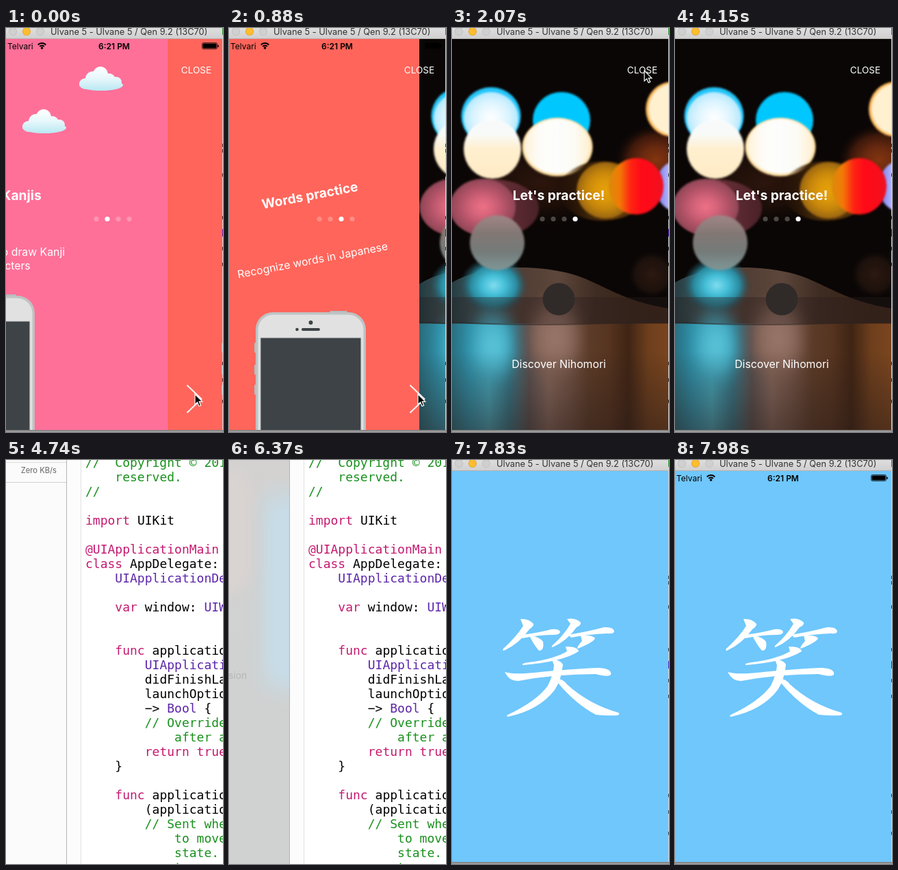
These frames come from a looping animation (317 px wide and 587 px high, 8000 ms). An HTML page with a canvas:

```html
<!DOCTYPE html>
<html lang="en">
<head>
<meta charset="utf-8">
<title>Onboarding walkthrough</title>
<style>
html, body { margin: 0; width: 100%; height: 100%; overflow: hidden; background: #fff; }
canvas { display: block; width: 317px; height: 587px; }
</style>
</head>
<body>
<canvas id="stage" width="317" height="587"></canvas>
<script>
const W = 317, H = 587, LOOP = 8000, PAGE = 320, MID = 156;
const ctx = document.getElementById('stage').getContext('2d');
const UI = 'Inter, Roboto, sans-serif';
const MONO = '"DejaVu Sans Mono", "Liberation Mono", monospace';
const PINK = '#ff7099', CORAL = '#ff655b', SKY = '#6fc7fc';

// The picture only changes at these moments.
const TICKS = [0, 140, 290, 740, 880, 1030, 1180, 1330, 1630, 1780, 1920, 2070,
  3270, 3420, 3560, 3710, 4000, 4150, 4740, 4890, 6370, 6520, 6660,
  7250, 7390, 7540, 7830, 7980];

const clamp = v => Math.max(0, Math.min(1, v));
const lerp = (a, b, k) => a + (b - a) * k;
const ease = k => k < .5 ? 2 * k * k : 1 - 2 * (1 - k) * (1 - k);
const scroll = (t, start) => ease(clamp((t - start) / 410));

function rect(x, y, w, h, fill) {
  ctx.fillStyle = fill;
  ctx.fillRect(x, y, w, h);
}

function oval(x, y, rx, ry, fill) {
  ctx.beginPath();
  ctx.ellipse(x, y, rx, ry, 0, 0, Math.PI * 2);
  ctx.fillStyle = fill;
  ctx.fill();
}

function round(x, y, w, h, r, fill) {
  ctx.beginPath();
  ctx.roundRect(x, y, w, h, r);
  ctx.fillStyle = fill;
  ctx.fill();
}

function text(str, x, y, font, fill, align = 'left') {
  ctx.font = font;
  ctx.fillStyle = fill;
  ctx.textAlign = align;
  ctx.fillText(str, x, y);
}

function at(x, y, draw, turn = 0) {
  ctx.save();
  ctx.translate(x, y);
  ctx.rotate(turn);
  draw();
  ctx.restore();
}

function faded(alpha, draw) {
  ctx.save();
  ctx.globalAlpha *= alpha;
  draw();
  ctx.restore();
}

function clipped(x, y, w, h, draw) {
  ctx.save();
  ctx.beginPath();
  ctx.rect(x, y, w, h);
  ctx.clip();
  draw();
  ctx.restore();
}

function spread(g, colors) {
  colors.forEach((c, i) => g.addColorStop(i / (colors.length - 1), c));
  return g;
}
const down = (y0, y1, ...colors) => spread(ctx.createLinearGradient(0, y0, 0, y1), colors);
const across = (x0, x1, ...colors) => spread(ctx.createLinearGradient(x0, 0, x1, 0), colors);

const heading = (str, y = 0) => text(str, 0, y, `700 19.2px ${UI}`, '#fff', 'center');
const caption = (str, y = 0) => text(str, 0, y, `400 15.8px ${UI}`, '#fff', 'center');

function cloud(x, y) {
  at(x, y, () => {
    const fill = down(0, 35, '#ffffff', '#e6f7fb', '#b9e8f2');
    oval(31, 12, 11, 12, fill);
    oval(20, 18, 11, 11, fill);
    oval(44, 19, 9, 9, fill);
    oval(54, 23, 8, 8, fill);
    oval(10, 25, 10, 8, fill);
    oval(32, 27, 32, 8, fill);
  });
}

function phone(cx, top) {
  at(cx - 80.5, top, () => {
    round(108, -1, 26, 6, 2, '#b5bbbd');
    for (const y of [45, 77, 106]) round(-2, y, 5, 15, 2, '#b5bbbd');
    round(0, 1, 161, 300, 25, '#bfc3c3');
    round(3.5, 4.5, 154, 300, 22, '#e1e1e1');
    oval(80.5, 16, 3, 3, '#3e4447');
    oval(60.5, 26, 2.3, 2.3, '#3e4447');
    round(67, 24, 27, 4, 2, '#3e4447');
    rect(6.5, 37.5, 148, 260, '#c9cccc');
    rect(7.5, 38.5, 146, 260, '#3d4346');
  });
}

function glow(x, y, rx, ry, ...colors) {
  at(x, y, () => {
    ctx.scale(rx, ry);
    oval(0, 0, 1, 1, spread(ctx.createRadialGradient(0, 0, 0, 0, 0, 1), colors));
  });
}

function quay() {
  ctx.beginPath();
  ctx.moveTo(-4, 372);
  ctx.bezierCurveTo(40, 345, 110, 343, 165, 355);
  ctx.bezierCurveTo(215, 366, 240, 396, 320, 408);
  ctx.lineTo(320, 436);
  ctx.lineTo(-4, 436);
  ctx.fillStyle = across(-4, 316, '#223a40', '#4a5e61', '#523e35', '#5d463b', '#3f2c22', '#3a2519', '#3a2418');
  ctx.fill();

  glow(61, 374, 50, 42, '#7fdcee', '#45bfd8', '#2a8ba0', 'rgba(30,80,92,0)');
  rect(-4, 429, PAGE, 160, across(-4, 316,
    '#2a6a7a', '#2f8fa8', '#46a9be', '#35788a', '#5a5150', '#86685d', '#735447',
    '#5c3c29', '#563420', '#3f2414', '#6e3f1d', '#7a451f'));
  ctx.filter = 'blur(7px)';
  glow(60, 462, 40, 66, '#5cc6da', '#49b2c9', 'rgba(50,150,172,0)');
  glow(150, 450, 46, 70, '#9a796c', '#8b6a5d', 'rgba(120,88,74,0)');
  ctx.filter = 'none';
  rect(-4, 470, PAGE, 120, down(470, 584, 'rgba(42,28,24,0)', 'rgba(42,28,24,.5)'));
  rect(-4, 391, PAGE, 39, 'rgba(40,30,28,.36)');
  ctx.beginPath();
  ctx.moveTo(-4, 427);
  ctx.quadraticCurveTo(120, 436, 316, 425);
  ctx.strokeStyle = 'rgba(45,35,34,.55)';
  ctx.lineWidth = 2;
  ctx.stroke();
}

// Night lights out of focus above a wet quay.
function photo() {
  rect(-4, 16, PAGE, 568, '#0a0605');
  glow(130, 225, 120, 70, '#2c150c', '#1c0e08', 'rgba(10,6,5,0)');
  glow(298, 192, 62, 54, '#83350f', '#6a2a10', '#3d180b', 'rgba(10,6,5,0)');
  glow(292, 358, 36, 36, '#2c1912', '#24140e', '#1d110c', 'rgba(10,6,5,0)');
  quay();

  ctx.filter = 'blur(1.6px)';
  oval(62, 262, 65, 42, across(-4, 127, '#5e3038', '#693038', '#4a2128'));
  glow(45, 260, 48, 41, '#ee7085', '#d5647a', '#b45368', '#8f4656');
  oval(66, 312, 40, 40, down(272, 352, '#a08586', '#827774', '#747b79', '#7f9797'));

  oval(57, 128, 43.5, 42, '#25c6fa');
  glow(57, 131, 40, 38, '#ffffff', '#eefaff', '#d9f3fe', '#b5e9fd');
  oval(59, 176, 42, 43, down(133, 219, '#f8fafa', '#f8faf8', '#ffefce', '#ffedca', '#fdeac4'));

  oval(160, 134, 42, 41, '#00c8ff');
  oval(154, 173, 51.5, 42.5, '#fcdca0');
  oval(154, 172, 48.5, 40, across(104, 203, '#fff2d6', '#fdfcf8', '#fcfdfc', '#fcfbf5', '#ffefcf'));

  oval(322, 118, 39, 40, '#fcb85a');
  oval(323, 118, 36, 37, '#fff0cf');
  oval(335, 230, 38, 39, across(297, 317, '#6f72e0', '#b3b5ff'));

  oval(220, 237, 64, 43, across(156, 240, 'rgba(50,25,8,0)', '#3c2409', '#5c360b'));
  glow(224, 236, 42, 41, '#e5a008', '#dc980a', '#c5850b', '#996511');
  oval(269, 230, 40, 41, across(229, 309, '#d98a0a', '#f27a06', '#fd2412', '#ff0a18', '#fa0c1a', '#ee1020'));
  ctx.filter = 'none';
}

function practicePage() {
  clipped(-4, 16, PAGE, 568, photo);
  at(MID, 250, () => heading("Let's practice!"));
  oval(156, 394, 23.5, 23.5, '#302b29');
  at(MID, 494, () => caption('Discover Nihomori'));
}

function kanjiPage(p) {
  rect(-4 - p * PAGE, 16, PAGE, 568, PINK);
  const slide = MID - 2 * p * PAGE;
  cloud(187 - p * PAGE, 56);
  cloud(104 - p * PAGE, 118);
  at(slide, 250, () => heading('Draw Kanjis'));
  at(slide, 331, () => { caption('Learn how to draw Kanji'); caption('characters', 20); });
  phone(157.5 - 784 * p, 388);
}

// k: -1 waiting on the right, 0 centred, 1 gone to the left
function wordsPage(k) {
  const dx = -k * PAGE, turn = -k * Math.PI / 2;
  rect(-4 + dx, 16, PAGE, 568, CORAL);
  at(MID + dx, 243, () => heading('Words practice', 7), turn);
  at(MID + dx + 4, 337, () => caption('Recognize words in Japanese', 6), turn);
  phone(157.5 + dx, 412);
}

function statusBar() {
  text('Telvari', 2, 31, `400 12px ${UI}`, '#000');
  ctx.strokeStyle = '#000';
  ctx.lineWidth = 2;
  for (const r of [4.5, 8]) {
    ctx.beginPath();
    ctx.arc(52.5, 30, r, -Math.PI * .76, -Math.PI * .24);
    ctx.stroke();
  }
  oval(52.5, 29, 1.8, 1.8, '#000');
  text('6:21 PM', 158, 31, `600 12px ${UI}`, '#000', 'center');
  ctx.beginPath();
  ctx.roundRect(286.5, 21.5, 22, 9, 2);
  ctx.lineWidth = .7;
  ctx.stroke();
  round(287.5, 22.5, 20, 7, 1, '#000');
  round(309.4, 24.5, 1.4, 3.5, 1, '#000');
}

function windowFrame() {
  rect(0, 0, W, 16, down(0, 16, '#dedede', '#cfcfcf'));
  rect(0, 15, W, 1, '#b5b0b0');
  [[10, '#d0d0d0', '#bcbcbc'], [30, '#fdbd2f', '#dfa023'], [50, '#d0d0d0', '#bcbcbc']]
    .forEach(([x, fill, edge]) => {
      oval(x, 5, 6, 6, edge);
      oval(x, 5, 5.2, 5.2, fill);
    });
  text('Ulvane 5 - Ulvane 5 / Qen 9.2 (13C70)', 65, 10, `400 12.8px ${UI}`, '#333');
  rect(316, 0, 1, H, '#d9d9d9');
  for (const y of [168, 176, 211, 273, 318, 341, 485, 509, 540]) rect(316, y, 1, 5, '#444');
  rect(316, 0, 1, 10, '#2a932a');
  rect(316, 292, 1, 11, '#5b2bb5');
  rect(0, 584, W, 3, down(584, 587, '#777', '#aaa'));
}

function chevron() {
  ctx.beginPath();
  ctx.moveTo(264.5, 519);
  ctx.lineTo(285.5, 539);
  ctx.lineTo(264.5, 559);
  ctx.strokeStyle = '#fff';
  ctx.lineWidth = 1.8;
  ctx.stroke();
}

function cursor(x, y) {
  at(x, y, () => {
    ctx.beginPath();
    [[0, 0], [0, 15], [3.6, 11.7], [6, 17.5], [8.6, 16.4], [6.2, 10.8], [10.8, 10.8]]
      .forEach(([a, b]) => ctx.lineTo(a, b));
    ctx.closePath();
    ctx.fillStyle = '#000';
    ctx.strokeStyle = '#fff';
    ctx.lineWidth = 1.2;
    ctx.fill();
    ctx.stroke();
  });
}

function pointer(t) {
  if (t < 1330) return cursor(276, 532);
  if (t < 4000) {
    const k = ease(clamp((t - 1480) / 590));
    return cursor(lerp(257, 281, k), lerp(191, 62, k));
  }
  if (t < 4150) cursor(160, 38);
}

function walkthrough(t) {
  const first = scroll(t, -145), second = scroll(t, 780);
  const pos = 1 + first + second;
  clipped(0, 16, 316, 568, () => {
    if (second < 1) wordsPage(pos - 2);
    if (first < 1) clipped(-4 - first * PAGE, 16, PAGE, 568, () => kanjiPage(first));
    if (second > 0) at((1 - second) * PAGE, 0, practicePage);
    if (second < 1) {
      statusBar();
      faded(clamp(2 - 2 * second), chevron);
    }
    for (let i = 0; i < 4; i++)
      oval(132 + 16 * i, 277.5, 3.6, 3.6, i === Math.round(pos) ? '#fff' : 'rgba(255,255,255,.26)');
    const press = t < 3270 || t >= 3710 ? 1 : t < 3560 ? .3 : .65;
    faded(press, () => text('CLOSE', 300, 66, `400 13.5px ${UI}`, '#fff', 'right'));
  });
  windowFrame();
  pointer(t);
}

// [row, column, colour, text, colour, text ...]
const GREEN = '#1a911e', KEY = '#c41a70', TYPE = '#5c26ab', INK = '#000';
const CODE = [
  [0, 0, GREEN, '//  Copyright © 2016'],
  [1, 4, GREEN, 'reserved.'],
  [2, 0, GREEN, '//'],
  [4, 0, KEY, 'import', INK, ' UIKit'],
  [6, 0, KEY, '@UIApplicationMain'],
  [7, 0, KEY, 'class', INK, ' AppDelegate: '],
  [8, 4, TYPE, 'UIApplicationDelegate'],
  [10, 4, KEY, 'var', INK, ' window: ', TYPE, 'UIWindow'],
  [13, 4, KEY, 'func', INK, ' application'],
  [14, 8, TYPE, 'UIApplication'],
  [15, 8, INK, 'didFinishLaunching'],
  [16, 8, INK, 'launchOptions'],
  [17, 8, INK, '−> ', TYPE, 'Bool', INK, ' {'],
  [18, 8, GREEN, '// Override'],
  [19, 12, GREEN, 'after application'],
  [20, 8, KEY, 'return true'],
  [21, 4, INK, '}'],
  [23, 4, KEY, 'func', INK, ' application'],
  [24, 8, INK, '(application'],
  [25, 8, GREEN, '// Sent when'],
  [26, 12, GREEN, 'to move'],
  [27, 12, GREEN, 'state.'],
  [28, 12, GREEN, 'temporary']
];

const netSpeed = () => text('Zero KB/s', 74, 19, `400 11.2px ${UI}`, '#666', 'right');

function gauges() {
  rect(0, 0, 88, H, '#fbfbfb');
  rect(0, 3, 88, 1, '#dcdcdc');
  rect(0, 32, 88, 1, '#cfcfcf');
  netSpeed();
}

function frosted() {
  rect(0, 0, 88, H, down(0, H, '#d4d2d1', '#d0d2d2', '#d0d2d1'));
  clipped(0, 0, 88, H, () => {
    ctx.filter = 'blur(9px)';
    round(42, 36, 90, 308, 32, '#ccd6da');
    round(56, 60, 80, 264, 26, '#c7dce7');
    round(-60, 14, 92, 180, 30, '#d9d3d1');
  });
}

function editor(t) {
  rect(0, 0, W, H, '#fff');
  gauges();
  const active = t < 4890 || t >= 7540 ? 0 : t >= 7390 ? .5 : 1;
  const idle = clamp((t - 6220) / 440);
  if (active) faded(active, () => {
    frosted();
    if (t < 6370) netSpeed();
    else faded(idle, () => text('No Debug Session', 26, 318, `400 13.6px ${UI}`, '#7f8181', 'right'));
  });
  rect(88, 0, 1, H, '#b4b4b4');
  rect(89, 0, 20, H, '#fcfcfc');
  rect(109, 0, 1, H, '#e2e2e2');
  for (const [row, col, ...parts] of CODE) {
    let x = 116 + col * 10.84;
    for (let i = 0; i < parts.length; i += 2) {
      text(parts[i + 1], x, 10 + 21 * row, `18px ${MONO}`, parts[i]);
      x += parts[i + 1].length * 10.84;
    }
  }
}

const BRUSH = [
  'M100 231Q112 230 119 238Q120 241 113 246Q98 267 76 277Q73 277 75 274Q94 257 104 241Z',
  'M101 254Q127 251 145 246Q157 245 158 250Q157 254 149 254Q127 254 103 259Z',
  'M113 255Q128 257 133 264Q135 277 127 277Q119 268 113 255Z',
  'M168 231Q180 229 188 236Q189 240 182 243Q168 263 147 272Q144 272 147 269Q164 254 173 238Z',
  'M170 254Q200 249 222 243Q236 242 237 249Q236 253 228 252Q200 253 174 258Z',
  'M188 255Q205 254 209 259Q208 264 184 274Q181 273 190 263Z',
  'M166 271Q184 271 185 278Q162 293 104 298Q99 296 112 294Q150 289 168 278Z',
  'M77 308Q90 312 120 309Q180 303 215 302Q234 303 232 312Q228 316 210 311Q150 311 97 321Q84 322 77 308Z',
  'M146 290Q158 290 162 297Q160 319 150 334Q128 363 82 373Q78 372 82 370Q124 350 140 328Q148 312 149 298Z',
  'M154 318Q162 318 168 326Q200 355 243 367Q246 369 242 371Q225 372 210 370Q181 355 154 323Z'
].map(d => new Path2D(d));

function launch(t) {
  rect(0, 0, W, H, SKY);
  ctx.fillStyle = '#fff';
  BRUSH.forEach(stroke => ctx.fill(stroke));
  if (t >= 7980) statusBar();
  windowFrame();
}

function draw(now) {
  const time = now % LOOP;
  const t = TICKS.filter(k => k <= time).pop() || 0;
  ctx.clearRect(0, 0, W, H);
  if (t < 4740) walkthrough(t);
  else if (t < 7830) editor(t);
  else launch(t);
}

let start;
function loop(now) {
  start ??= now;
  draw(Math.max(0, now - start));
  requestAnimationFrame(loop);
}
requestAnimationFrame(loop);
</script>
</body>
</html>
```
